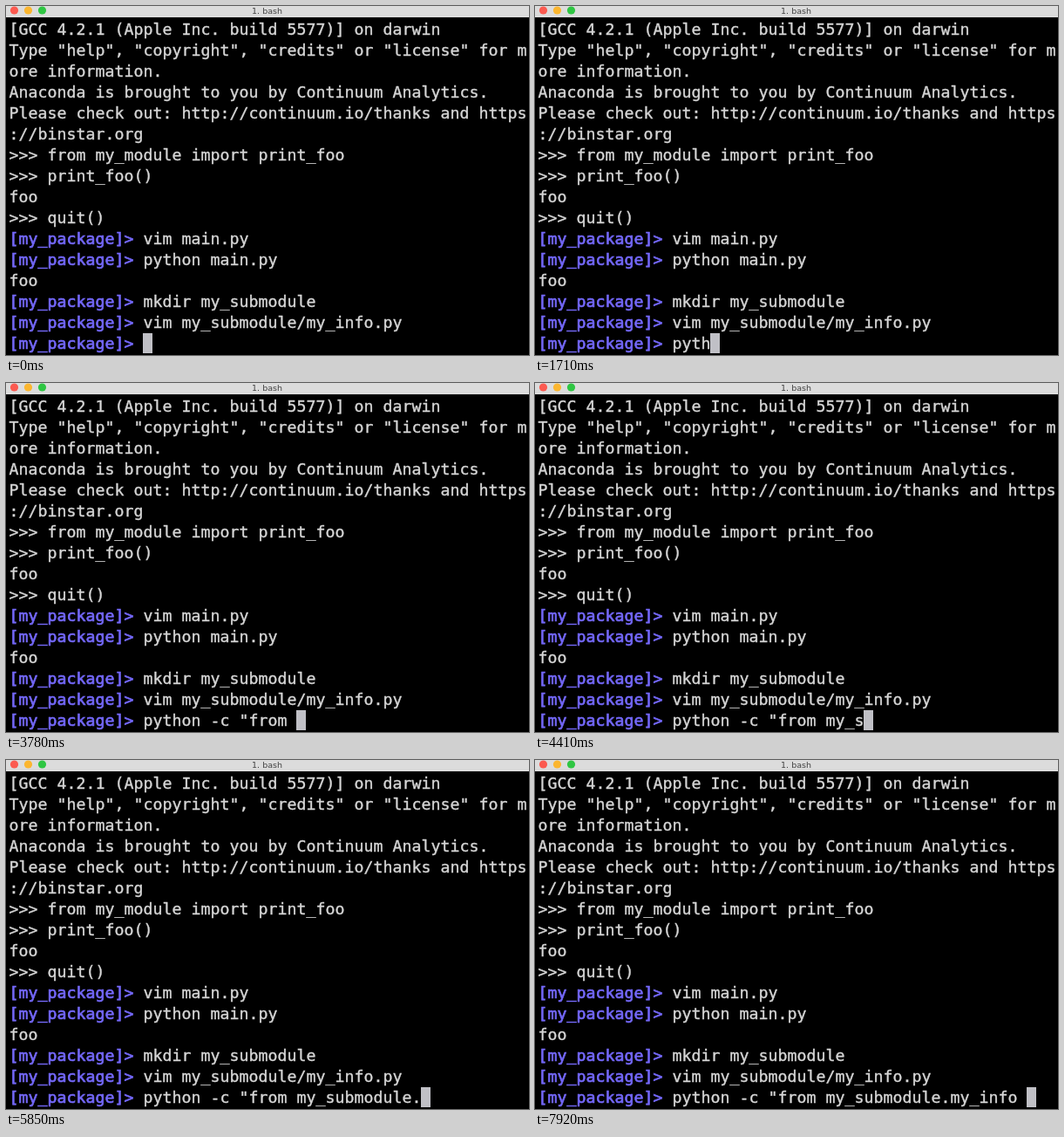
An HTML page with a canvas that plays this animation: 600 px wide and 400 px high, repeating every 8000 ms.

```html
<!DOCTYPE html>
<html lang="en">
<head>
<meta charset="utf-8">
<title>Terminal</title>
<style>
  html, body { margin: 0; width: 100%; height: 100%; overflow: hidden; background: #000; }
  canvas { display: block; }
</style>
</head>
<body>
<canvas id="stage" width="600" height="400"></canvas>
<script>
const ctx = document.getElementById('stage').getContext('2d');

const LOOP = 8000, STEP = 90;
const LEFT = 3.5, CELL = 11, BASELINE = 33, ROW = 24;
const TEXT = '#d6d6d6', PROMPT_COLOR = '#7468fa', CURSOR = '#c0c0c6';
const PROMPT = '[my_package]> ';
const COMMAND = 'python -c "from my_submodule.my_info ';

const history = [
  '[GCC 4.2.1 (Apple Inc. build 5577)] on darwin',
  'Type "help", "copyright", "credits" or "license" for m',
  'ore information.',
  'Anaconda is brought to you by Continuum Analytics.',
  'Please check out: http://continuum.io/thanks and https',
  '://binstar.org',
  '>>> from my_module import print_foo',
  '>>> print_foo()',
  'foo',
  '>>> quit()',
  PROMPT + 'vim main.py',
  PROMPT + 'python main.py',
  'foo',
  PROMPT + 'mkdir my_submodule',
  PROMPT + 'vim my_submodule/my_info.py',
];

// Typing progress: [time in ms, characters typed]
const typing = [
  [0, 0], [810, 0.6], [1710, 4.5], [2880, 10.5], [3780, 16.5],
  [4950, 24.5], [5850, 29.5], [6480, 31.4], [7290, 35.4], [7920, 37.5],
];

function typedCount(time) {
  const next = typing.findIndex(([t]) => t > time);
  if (next < 0) return COMMAND.length;
  const [t0, n0] = typing[next - 1], [t1, n1] = typing[next];
  return Math.floor(n0 + (n1 - n0) * (time - t0) / (t1 - t0));
}

function drawLine(line, row) {
  const promptLength = line.startsWith(PROMPT) ? PROMPT.length : 0;
  [...line].forEach((char, col) => {
    const inPrompt = col < promptLength;
    ctx.fillStyle = ctx.strokeStyle = inPrompt ? PROMPT_COLOR : TEXT;
    ctx.lineWidth = inPrompt ? 0.7 : 0.4;
    const x = LEFT + col * CELL, y = BASELINE + row * ROW;
    ctx.fillText(char, x, y);
    ctx.strokeText(char, x, y);
  });
}

function drawTitleBar() {
  ctx.fillStyle = '#dcdcdc';
  ctx.fillRect(0, 0, 600, 13);
  ['#fb5a50', '#fbb62f', '#2fc643'].forEach((color, i) => {
    ctx.fillStyle = color;
    ctx.beginPath();
    ctx.arc(9.5 + 16 * i, 5, 4.6, 0, Math.PI * 2);
    ctx.fill();
  });
  ctx.font = '9.5px "DejaVu Sans", sans-serif';
  ctx.textAlign = 'center';
  ctx.fillStyle = '#404040';
  ctx.fillText('1. bash', 299.5, 9);
}

function draw(now) {
  const time = Math.floor(now % LOOP / STEP) * STEP;
  const line = PROMPT + COMMAND.slice(0, typedCount(time));

  ctx.fillStyle = '#000';
  ctx.fillRect(0, 0, 600, 400);
  drawTitleBar();

  ctx.font = '18.24px "DejaVu Sans Mono", monospace';
  ctx.textAlign = 'left';
  [...history, line].forEach(drawLine);

  ctx.fillStyle = CURSOR;
  ctx.fillRect(Math.floor(LEFT + line.length * CELL), 375, 11, 23);
}

const start = performance.now();
function frame() {
  draw(performance.now() - start);
  requestAnimationFrame(frame);
}
frame();
</script>
</body>
</html>
```
